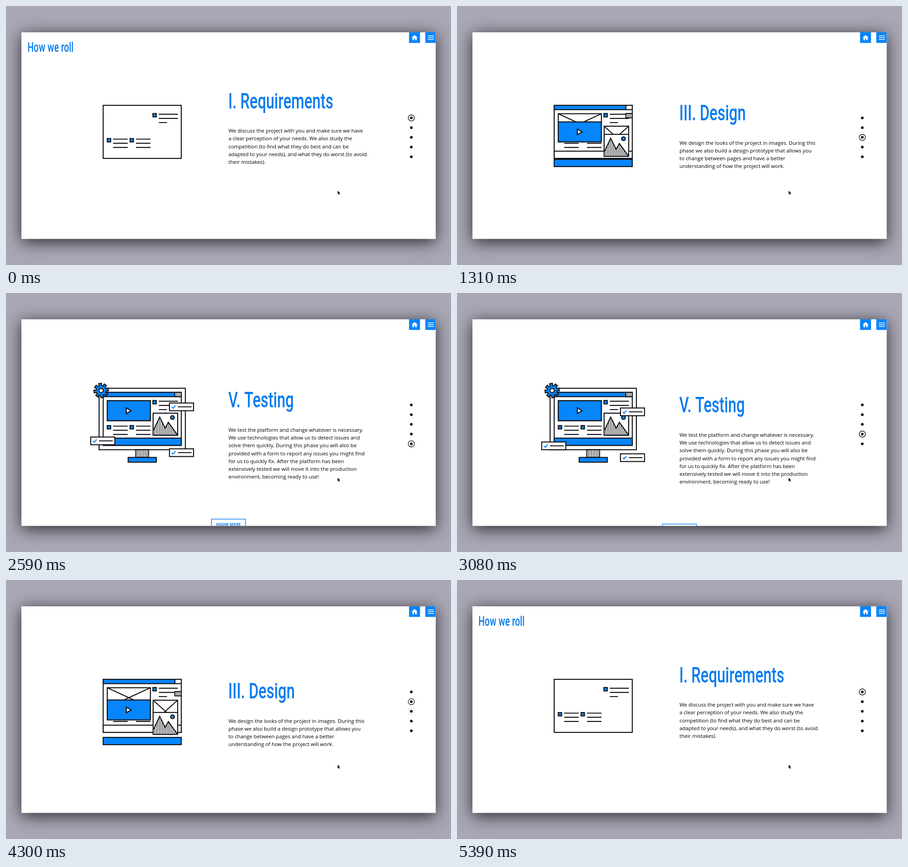
These frames come from a looping animation (980 px wide and 571 px high, 5420 ms). An HTML page with a canvas:

```html
<!DOCTYPE html>
<html lang="en">
<head>
<meta charset="utf-8">
<title>How we roll</title>
<style>
  html, body { margin: 0; width: 100%; height: 100%; overflow: hidden; background: #a9a6b5; }
  canvas { display: block; }
</style>
</head>
<body>
<canvas id="stage" width="980" height="571"></canvas>
<script>
const ctx = document.getElementById('stage').getContext('2d');

const BLUE = '#0785fb', TITLE = '#087ced', INK = '#101116', WHITE = '#fff';
const PAGE = { x: 34, y: 58, w: 912.4, h: 455.5 };
const LOOP = 5420, MOVE = 630, FADE = 180;
const CONDENSED = 0.67; // horizontal scale of the narrow title face

// Start time and target section of each scroll
const MOVES = [
  [90, 1], [815, 2], [1480, 3], [2143, 4],
  [2885, 3], [3560, 2], [4146, 1], [4772, 0]
];

const SECTIONS = [
  ['I. Requirements',
    'We discuss the project with you and make sure we have',
    'a clear perception of your needs. We also study the',
    'competition (to find what they do best and can be',
    'adapted to your needs), and what they do worst (to avoid',
    'their mistakes).'],
  ['II. Wireframes',
    'We design wireframes of the platform that represent',
    'where each element will be.'],
  ['III. Design',
    'We design the looks of the project in images. During this',
    'phase we also build a design prototype that allows you',
    'to change between pages and have a better',
    'understanding of how the project will work.'],
  ['IV. Development',
    'We have an agile methodology that allows us to quickly',
    'progress on the development stage which includes',
    'having weekly meetings. During this phase we put a',
    'development version online so you can access it. On this',
    'development environment we use a tool that allow us to',
    'quickly find errors and solve them.'],
  ['V. Testing',
    'We test the platform and change whatever is necessary.',
    'We use technologies that allow us to detect issues and',
    'solve them quickly. During this phase you will also be',
    'provided with a form to report any issues you might find',
    'for us to quickly fix. After the platform has been',
    'extensively tested we will move it into the production',
    'environment, becoming ready to use!']
];

const ease = p => p < 0.5 ? 4 * p ** 3 : 1 - 4 * (1 - p) ** 3;
const clamp = v => Math.max(0, Math.min(1, v));

function stateAt(t) {
  let pos = 0, from = 0, to = 0, fade = 1;
  for (const [start, target] of MOVES) {
    if (t < start) break;
    from = to;
    to = target;
    pos = from + (to - from) * ease(clamp((t - start) / MOVE));
    fade = clamp((t - start) / FADE);
  }
  return { pos, from, to, fade };
}

function box(x, y, w, h, fill) {
  if (fill) {
    ctx.fillStyle = fill;
    ctx.fillRect(x, y, w, h);
  }
  ctx.strokeRect(x, y, w, h);
}

function poly(points, fill, closed = true) {
  ctx.beginPath();
  points.forEach(([x, y]) => ctx.lineTo(x, y));
  if (closed) ctx.closePath();
  if (fill) {
    ctx.fillStyle = fill;
    ctx.fill();
  }
  ctx.stroke();
}

const line = (x1, y1, x2, y2) => poly([[x1, y1], [x2, y2]], null, false);

function disc(x, y, r, fill, outline) {
  ctx.beginPath();
  ctx.arc(x, y, r, 0, Math.PI * 2);
  if (fill) {
    ctx.fillStyle = fill;
    ctx.fill();
  }
  if (outline) ctx.stroke();
}

function stripes(x1, x2, y1, y2, step) {
  ctx.save();
  ctx.lineWidth = 1.2;
  for (let x = x1 + step; x < x2 - 1; x += step) line(x, y1, x, y2);
  ctx.restore();
}

function crossBox(x, y, w, h) {
  box(x, y, w, h);
  line(x, y, x + w, y + h);
  line(x + w, y, x, y + h);
}

function bullet(x, y, gap, lengths) {
  box(x, y, 7.5, 7.5, BLUE);
  lengths.forEach((len, i) => line(x + 13, y + gap + i * 9.2, x + 13 + len, y + gap + i * 9.2));
}

function gear(cx, cy) {
  const points = [], teeth = 8;
  for (let i = 0; i < teeth; i++) {
    const mid = i * Math.PI * 2 / teeth - 0.15;
    for (const [da, r] of [[-0.25, 11], [-0.19, 16], [0.19, 16], [0.25, 11]]) {
      points.push([cx + r * Math.cos(mid + da), cy + r * Math.sin(mid + da)]);
    }
  }
  poly(points, BLUE);
  disc(cx, cy, 4.6, WHITE, true);
}

function checkCard(x, y) {
  box(x, y, 53, 17, WHITE);
  line(x + 18.5, y + 8.5, x + 48.5, y + 8.5);
  ctx.save();
  ctx.strokeStyle = BLUE;
  poly([[x + 5, y + 8.5], [x + 8, y + 11.5], [x + 13, y + 5.5]], null, false);
  ctx.restore();
}

// Illustration pieces added by each section
const LAYERS = [
  () => {
    box(214, 219, 172, 117);
    bullet(323.5, 237, 1.6, [42, 42, 18]);
    bullet(223, 292.2, 1.3, [32, 32, 32]);
    bullet(273.2, 292.2, 1.3, [32, 32, 32]);
  },
  () => {
    box(214, 219, 158, 9.5, BLUE);
    box(372, 219, 14, 9.5, WHITE);
    crossBox(223, 237.5, 95, 44);
    crossBox(324, 265, 54, 48.5);
    box(214, 320, 172, 16);
  },
  () => {
    box(372, 219, 14, 9.5, WHITE);
    stripes(372, 386, 219, 228, 3.5);
    box(223, 237.5, 95, 44, BLUE);
    poly([[265, 253.2], [275.5, 259.5], [265, 265.8]], WHITE);
    box(324, 265, 54, 48.5, WHITE);
    disc(366.6, 274.5, 4.2, BLUE, true);
    const ridge = [[325, 302], [338.5, 273.5], [350.5, 298], [357.5, 285], [377, 312]];
    ctx.save();
    ctx.beginPath();
    [[325, 313], ...ridge, [377, 313]].forEach(([x, y]) => ctx.lineTo(x, y));
    ctx.clip();
    stripes(324, 378, 270, 313, 3.4);
    ctx.restore();
    poly(ridge, null, false);
    box(214, 320, 172, 16, BLUE);
  },
  () => {
    box(205, 210, 190, 135.5);
    box(286, 345.5, 28, 17, WHITE);
    stripes(286, 314, 346, 362, 3.5);
    box(269, 362.5, 62, 10.5, BLUE);
    gear(209.5, 215);
  },
  () => {
    checkCard(360, 198.5);
    checkCard(186.5, 273.5);
    checkCard(360, 299.5);
  }
];

function title(str, x, y, size) {
  ctx.save();
  ctx.translate(x, y);
  ctx.scale(CONDENSED, 1);
  ctx.font = `500 ${size}px Roboto, "Open Sans", sans-serif`;
  ctx.fillStyle = TITLE;
  ctx.fillText(str, 0, 0);
  ctx.restore();
}

function sectionText([name, ...lines]) {
  const first = 322.2 - 8.62 * lines.length;
  title(name, 489.5, Math.round(first - 53.6), 49);
  ctx.font = '11.45px "Open Sans", "Noto Sans", sans-serif';
  ctx.fillStyle = '#000';
  lines.forEach((str, i) => ctx.fillText(str, 490, Math.round(first + i * 17.25)));
}

function moreButton() {
  ctx.save();
  ctx.strokeStyle = TITLE;
  ctx.lineWidth = 1.4;
  box(452.5, 454.5, 75, 24);
  ctx.font = 'bold 8.4px "Open Sans", "Noto Sans", sans-serif';
  ctx.fillStyle = TITLE;
  ctx.textAlign = 'center';
  ctx.fillText('KNOW MORE', 490, 469);
  ctx.restore();
}

function background() {
  ctx.fillStyle = '#a9a6b5';
  ctx.fillRect(0, 0, 980, 571);
  ctx.save();
  ctx.shadowColor = 'rgba(0,0,0,.76)';
  ctx.shadowBlur = 33;
  ctx.shadowOffsetY = 6;
  ctx.fillStyle = WHITE;
  ctx.fillRect(PAGE.x, PAGE.y, PAGE.w, PAGE.h);
  ctx.restore();
}

const HOME = new Path2D('M10 20v-6h4v6h5v-8h3L12 3 2 12h3v8z');

function topButtons() {
  ctx.fillStyle = BLUE;
  ctx.fillRect(887.6, 58, 24.2, 23.4);
  ctx.fillRect(923.4, 58, 23, 23.4);
  ctx.fillStyle = WHITE;
  for (let i = 0; i < 3; i++) ctx.fillRect(929, 65 + i * 4, 13.5, 1.5);
  ctx.save();
  ctx.translate(891.8, 62);
  ctx.scale(0.67, 0.67);
  ctx.fill(HOME);
  ctx.restore();
}

function dots({ from, to, fade }) {
  ctx.save();
  ctx.lineWidth = 1.4;
  for (let i = 0; i < SECTIONS.length; i++) {
    const y = 246.8 + i * 21.4;
    disc(892.6, y, 3, INK);
    ctx.globalAlpha = i === to ? fade : i === from ? 1 - fade : 0;
    disc(892.6, y, 6.8, null, true);
    ctx.globalAlpha = 1;
  }
  ctx.restore();
}

function cursor() {
  ctx.save();
  ctx.translate(730.4, 407.2);
  ctx.strokeStyle = WHITE;
  ctx.lineWidth = 1.6;
  poly([[0, 0], [0, 7.8], [1.8, 6.3], [3.1, 9.4], [4.5, 8.8], [3.2, 5.8], [5.4, 5.5]]);
  ctx.fillStyle = '#000';
  ctx.fill();
  ctx.restore();
}

function draw(t) {
  const state = stateAt(t);
  const scroll = Math.round(state.pos * PAGE.h);

  background();
  ctx.save();
  ctx.beginPath();
  ctx.rect(PAGE.x, PAGE.y, PAGE.w, PAGE.h);
  ctx.clip();
  ctx.strokeStyle = INK;
  ctx.lineWidth = 2.2;

  const shifted = (dy, paint) => {
    if (Math.abs(dy) >= PAGE.h) return;
    ctx.save();
    ctx.translate(0, dy);
    paint();
    ctx.restore();
  };

  SECTIONS.forEach((section, i) => {
    const dy = Math.round(i * PAGE.h) - scroll;
    shifted(Math.max(0, dy), LAYERS[i]);
    shifted(dy, () => {
      sectionText(section);
      if (i === 0) title('How we roll', 47.3, 101, 29);
      if (i === 4) moreButton();
    });
  });

  topButtons();
  dots(state);
  cursor();
  ctx.restore();
}

const begin = performance.now();
function tick() {
  draw((performance.now() - begin) % LOOP);
  requestAnimationFrame(tick);
}
tick();
</script>
</body>
</html>
```
